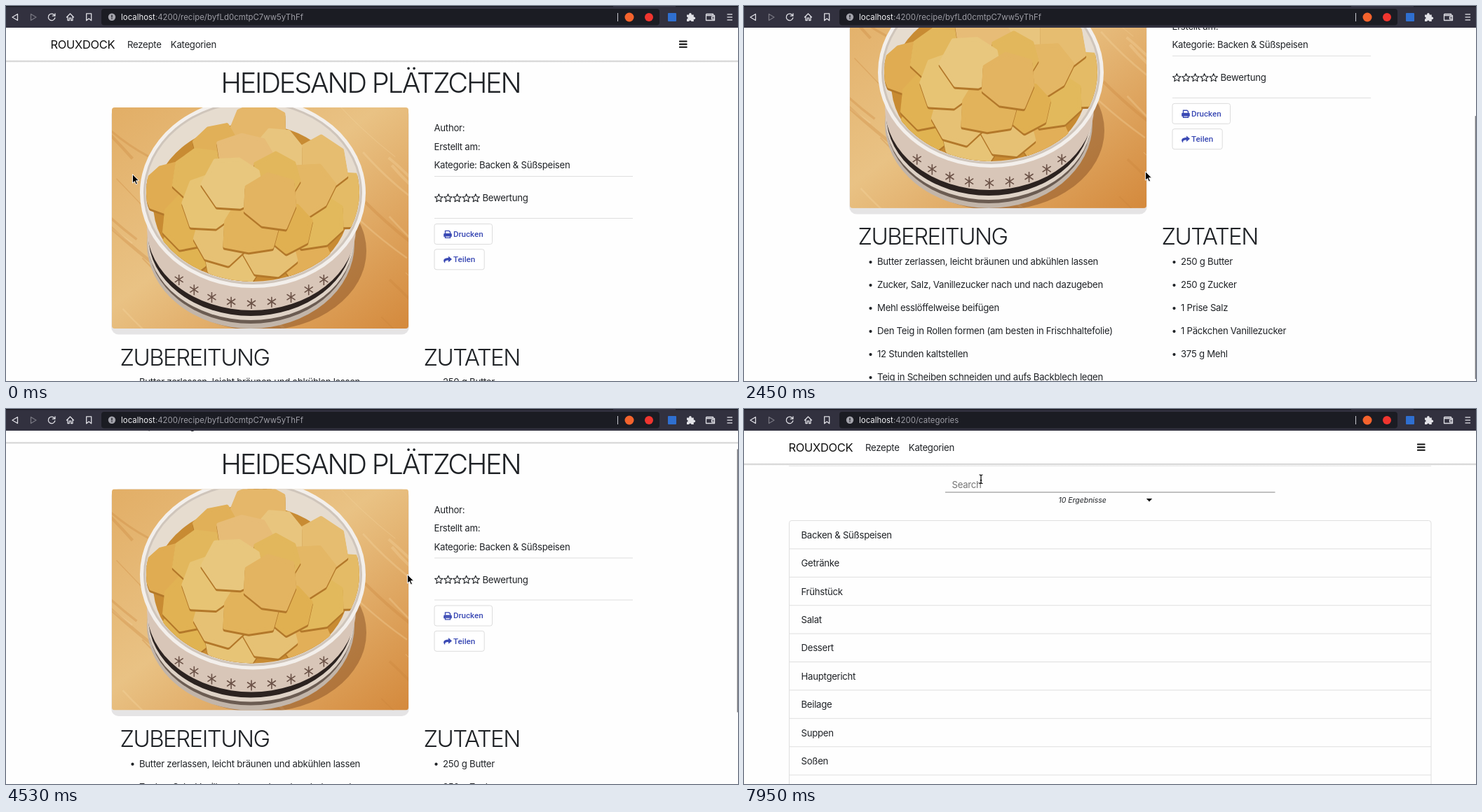
These frames come from a looping animation (1044x536 px, 8000 ms). An HTML page:

```html
<!DOCTYPE html>
<html lang="de">
<head>
<meta charset="utf-8">
<title>Rezepte</title>
<style>
  html, body { margin: 0; width: 100%; height: 100%; overflow: hidden; background: #fefefe; }
  svg { display: block; width: 1044px; height: 536px; }
  text { font: 13.2px Inter, "Noto Sans", sans-serif; letter-spacing: -.021em; fill: #1f2226; white-space: pre; }
  .brand { font-size: 16.5px; letter-spacing: -.02em; fill: #111; }
  .title { font-size: 39.6px; font-weight: 300; letter-spacing: -.0535em; }
  .head { font-size: 33px; font-weight: 300; letter-spacing: -.047em; }
  .btn { font: 500 11.55px Roboto, sans-serif; letter-spacing: 0; fill: #3a49b4; }
  .url { font-size: 11.4px; letter-spacing: .002em; fill: #9c9ca4; }
  .url tspan { fill: #f1f1f4; }
  .count { font-size: 10.56px; font-style: italic; letter-spacing: -.005em; }
  .hint { fill: #757575; }
  .line { stroke: #dfdfdf; fill: none; }
  .box { stroke: #dcdcdc; fill: #fff; }
  .icon { stroke: #dedee4; fill: none; stroke-width: 1.3; stroke-linejoin: round; stroke-linecap: round; }
</style>
</head>
<body>
<svg id="stage" viewBox="0 0 1044 536" xmlns="http://www.w3.org/2000/svg"></svg>
<script>
const text = (x, y, s, cls = '', id = '') => `<text x="${x}" y="${y}" class="${cls}" id="${id}">${s}</text>`;
const rect = (x, y, w, h, fill, r = 0) => `<rect x="${x}" y="${y}" width="${w}" height="${h}" rx="${r}" fill="${fill}"/>`;
const oval = (cx, cy, rx, ry, attrs) => `<ellipse cx="${cx}" cy="${cy}" rx="${rx}" ry="${ry}" ${attrs}/>`;
const circle = (x, y, r, fill) => oval(x, y, r, r, `fill="${fill}"`);
const path = (d, attrs) => `<path d="${d}" ${attrs}/>`;
const times = (n, fn) => Array.from({ length: n }, (_, i) => fn(i)).join('');

let seed = 11;
const random = () => (seed = seed * 16807 % 2147483647) / 2147483647;

// Closed ring of points around a centre; radius(i) gives each distance
const ring = (n, cx, cy, radius, turn = 0) => times(n, i => {
  const a = i / n * 2 * Math.PI + turn, r = radius(i);
  return `${(cx + r * Math.cos(a)).toFixed(1)},${(cy + r * Math.sin(a)).toFixed(1)} `;
});

const star = (cx, cy) => `<polygon points="${ring(10, cx, cy, i => i % 2 ? 2.7 : 6, -Math.PI / 2)}"
  fill="none" stroke="#1f2226" stroke-width="1.1" stroke-linejoin="round"/>`;

function list(x, items) {
  return items.map((s, i) => circle(x - 9.5, 538.2 + i * 33, 2.1, '#1f2226') + text(x, 542.4 + i * 33, s)).join('');
}

// One biscuit of a sunflower layout, outermost first
function biscuit(i, total) {
  const far = Math.sqrt(1 - i / total), a = i * 2.4;
  const cx = 350 + 128 * far * Math.cos(a), cy = 278 + 106 * far * Math.sin(a);
  const size = 34 + 8 * random();
  const pts = ring(7, cx, cy, () => size * (.82 + .3 * random()), a);
  const fill = `hsl(${37 + 5 * random()} 70% ${59 + 12 * random()}%)`;
  const shape = (color, dy) => `<polygon points="${pts}" fill="${color}" stroke="${color}" stroke-width="6"
    stroke-linejoin="round" transform="translate(0 ${dy})"/>`;
  return shape('#b3782a', 3) + shape(fill, 0);
}

// Simplified photo: a round tin of biscuits on a wooden table
function photo() {
  const grain = times(30, () => {
    const x = 90 + 480 * random(), y = 125 + 320 * random();
    return path(`M${x} ${y}q40 ${30 + 20 * random()} 90 ${70 + 30 * random()}`,
      `fill="none" stroke="${random() < .6 ? '#c58238' : '#f5d7a2'}" stroke-width="${1 + 4 * random()}" opacity=".3"`);
  });
  const pattern = times(9, i => {
    const a = (i * 12 + 42) * Math.PI / 180;
    const x = 350 + 139 * Math.cos(a), y = 322 + 103 * Math.sin(a);
    return path(`M${x - 6} ${y - 4}l12 8m-12 0l12 -8m-6 -3v15`, 'stroke="#6a5146" stroke-width="1.6" fill="none"');
  });
  return `<g clip-path="url(#frame)">${rect(151, 145, 423, 316, 'url(#wood)')}${grain}
    ${oval(362, 350, 152, 114, 'fill="#7c481f" opacity=".45"')}
    ${oval(349, 340, 148, 121, 'fill="#c2b5a9"')}
    ${oval(349, 337, 146, 117, 'fill="#6b5c52"')}
    ${oval(349, 334, 147, 115, 'fill="#ded2c6"')}
    ${oval(349, 329, 146, 114, 'fill="#2c2320"')}
    ${oval(350, 318, 149, 117, 'fill="#d8c6b8"')}${pattern}
    ${oval(352, 267, 161, 136, 'fill="#f3efeb"')}
    ${oval(352, 267, 156, 131, 'fill="#cfc5bb"')}
    ${oval(352, 267, 153, 128, 'fill="#e6dccf"')}
    <g clip-path="url(#tin)">${oval(350, 284, 140, 116, 'fill="#c88b33"')}${times(22, i => biscuit(i, 22))}</g></g>`;
}

const nav = rect(0, 20, 1044, 58, '#fff') + rect(0, 78, 1044, 3, 'url(#shade)') +
  text(63.5, 61, 'ROUXDOCK', 'brand') + text(173, 59.8, 'Rezepte') + text(234.8, 59.8, 'Kategorien', '', 'link') +
  times(3, i => rect(960, 49.5 + i * 4.1, 11.5, 2.1, '#111', .5));

const recipe = text(306.5, 123.5, 'HEIDESAND PLÄTZCHEN', 'title') +
  rect(150.3, 145, 424.4, 324.5, '#e5e4e5', 10) + photo() +
  ['Author:', 'Erstellt am:', 'Kategorie: Backen &amp; Süßspeisen']
    .map((s, i) => text(610.5, 179.3 + i * 26.4, s)).join('') +
  path('M611 243.5H894M611 303.5H894', 'class="line"') +
  times(5, i => star(617.3 + i * 13.1, 274.8)) + text(679.5, 279.2, 'Bewertung') +
  '<rect x="611" y="311.5" width="82.5" height="29" rx="3" class="box"/>' +
  '<rect x="611" y="347.8" width="71.2" height="29" rx="3" class="box"/>' +
  path('M626.5 325v-3.6h5.4l1.6 1.6v2M626.5 328.8h7v2.6h-7z', 'fill="#fff" stroke="#3a49b4" stroke-width="1.4"') +
  path('M624.2 326.2q0-1.3 1.3-1.3h9q1.3 0 1.3 1.3v3.6h-2v-1.7h-7.6v1.7h-2z', 'fill="#3a49b4"') +
  path('M631 357.6l5 4.3-5 4.3v-2.6c-4 0-5.2 1.2-4.8 4.2-3.8-3.6-2.3-7.7 4.8-7.7z', 'fill="#3a49b4"') +
  text(638, 330, 'Drucken', 'btn') + text(638, 366.3, 'Teilen', 'btn') +
  text(162.5, 513.6, 'ZUBEREITUNG', 'head') + text(595.5, 513.6, 'ZUTATEN', 'head') +
  list(190, ['Butter zerlassen, leicht bräunen und abkühlen lassen',
    'Zucker, Salz, Vanillezucker nach und nach dazugeben', 'Mehl esslöffelweise beifügen',
    'Den Teig in Rollen formen (am besten in Frischhaltefolie)', '12 Stunden kaltstellen',
    'Teig in Scheiben schneiden und aufs Backblech legen', '20 Minuten bei 170° backen']) +
  list(623, ['250 g Butter', '250 g Zucker', '1 Prise Salz', '1 Päckchen Vanillezucker', '375 g Mehl']);

const categories = ['Backen &amp; Süßspeisen', 'Getränke', 'Frühstück', 'Salat', 'Dessert',
  'Hauptgericht', 'Beilage', 'Suppen', 'Soßen'];
const search = rect(64, 80, 916, 2, '#e6e6e6') + text(296.5, 113, 'Search', 'hint') +
  rect(287, 118.5, 470.5, 1, '#858585') + path('M573.8 128h8.4l-4.2 4.6z', 'fill="#111"');
const results = text(448.5, 134.4, '10 Ergebnisse', 'count') +
  '<rect x="64.5" y="159.5" width="915.5" height="404" rx="3.5" class="line"/>' +
  categories.map((s, i) => text(81.5, 184.8 + i * 40.4, s) +
    path(`M65 ${(199.9 + i * 40.4).toFixed(1)}H980`, 'class="line"')).join('');

const host = '<tspan>localhost</tspan>:4200/';
const toolbar = rect(0, 0, 1044, 31, '#32313f') + rect(0, 0, 866, 1.3, '#191921') + rect(955, 0, 89, 1.3, '#191921') +
  rect(136, 4, 796, 23.5, '#1b1c23', 4) +
  path('M16.5 11.5v9l-7.5-4.5z', 'class="icon"') +
  path('M35.5 11.5v9l7.5-4.5z', 'class="icon" opacity=".4"') +
  path('M69 13A4.8 4.8 0 1 0 69.8 17M70 10.8v3.4h-3.6', 'class="icon"') +
  path('M86.5 16l5-5 5 5M88 15v5.5h2.3v-3.3h2.4v3.3H95V15', 'class="icon"') +
  path('M114.7 10.8h7v10l-3.5-2.8-3.5 2.8z', 'class="icon"') +
  circle(151, 15.8, 5.2, '#a3a3ab') + rect(150.3, 12.8, 1.4, 3.6, '#1b1c23') + rect(150.3, 17.3, 1.4, 1.4, '#1b1c23') +
  text(164, 19.8, host + 'recipe/byfLd0cmtpC7ww5yThFf', 'url', 'urlRecipe') +
  text(164, 19.8, host + 'categories', 'url', 'urlCats') +
  rect(872, 10, 1, 12, '#c9c9d0') + circle(889, 16, 6.5, '#f4632d') + circle(917, 16, 6, '#f0352f') +
  rect(944, 10, 12, 12, '#2f6fd0', 1) +
  path('M971 12.5h3.2a1.8 1.8 0 1 1 3.4 0h3.2v3.2a1.8 1.8 0 1 1 0 3.4v2.9h-3.4a1.6 1.6 0 0 0-3.2 0H971v-3.4a1.6 1.6 0 0 0 0-3.2z', 'fill="#e2e2e7"') +
  path('M999 11.5h9.5v2M998.5 12v8.5h12v-7h-11M1010.5 15.5h-4v3h4', 'class="icon"') +
  times(3, i => rect(1028.5, 11.3 + i * 4, 7.5, 1.3, '#dedee4'));

const cursor = `<g id="cursor">
  <g id="arrow">${path('M0 0v12.6l2.9-2.6 2.1 4.6 2-.9-2-4.5h4z', 'fill="#000" stroke="#fff" stroke-width=".9"')}</g>
  <g id="hand">${path('M-1.2 7V1.2q0-1.2 1.1-1.2t1.1 1.2V5q2-.5 2.3.6 2-.4 2.3.7 2-.2 2 1.4 0 3-1.6 4.5v2H-.6v-2Q-2.6 9.8-4.2 7.7q-.5-1.5.8-1.7 1 0 2.2 2M2.2 9v3M4.2 9v3M.4 9v3', 'fill="#fff" stroke="#000" stroke-width="1.1" stroke-linejoin="round"')}</g>
  <g id="beam">${path('M-2.5-6Q0-6 0-4.5Q0-6 2.5-6M0-4.5V5M-2.5 6.5Q0 6.5 0 5Q0 6.5 2.5 6.5M-1.3 1.8h2.6', 'fill="none" stroke="#000" stroke-width="1.2"')}</g>
</g>`;

const $ = id => document.getElementById(id);
$('stage').innerHTML = `<defs>
  <linearGradient id="wood" x1="0" y1="0" x2="1" y2="1"><stop stop-color="#e2ae66"/><stop offset=".45" stop-color="#e9c284"/><stop offset="1" stop-color="#d4893c"/></linearGradient>
  <linearGradient id="shade" x1="0" y1="0" x2="0" y2="1"><stop stop-color="#c4c4c4"/><stop offset="1" stop-color="#fefefe"/></linearGradient>
  <clipPath id="frame">${rect(151, 145, 423, 316, '#000', 4)}</clipPath>
  <clipPath id="tin">${oval(352, 267, 152, 127, '')}</clipPath>
</defs>
${rect(0, 0, 1044, 536, '#fefefe')}
<g id="page"><g id="recipe">${recipe}</g><g id="search">${search}</g><g id="results">${results}</g>${nav}</g>
<g id="bar">${rect(1042.7, 36, 1.3, 376, '#77777c')}</g>${toolbar}${cursor}`;

const LOOP = 8000, START = 534, TICK = 147.8;
const DEPTH = 201.5, SCROLL_DOWN = 6, SCROLL_UP = 22;
const ramp = (n, from, to) => Math.min(1, Math.max(0, (n - from) / (to - from)));
const smooth = k => k * k * (3 - 2 * k);

function scrollAt(n) {
  if (n < SCROLL_DOWN) return 0;
  if (n < SCROLL_UP) return DEPTH * (1 - Math.exp(-(((n - SCROLL_DOWN) / 4.25) ** 1.9)));
  const bounce = .8 * Math.exp(-2 * (n - 30) ** 2);
  return DEPTH * Math.exp(-(((n - SCROLL_UP) / 4.17) ** 3.5)) - bounce;
}

const home = { x: 180.5, y: 240.5 };
const moves = [
  { x: 572.5, y: 236.5, from: -1, to: 3, bow: 40 },
  { x: 577, y: 220.5, from: 29, to: 30, bow: 0 },
  { x: 241.5, y: 56, from: 30, to: 34, bow: 0 },
  { x: 338, y: 100, from: 45, to: 50, bow: 0 }
];

function cursorAt(n) {
  return moves.reduce((p, m) => {
    const k = smooth(ramp(n, m.from, m.to));
    return { x: p.x + (m.x - p.x) * k, y: p.y + (m.y - p.y) * k - m.bow * Math.sin(Math.PI * k) };
  }, home);
}

const show = (id, on) => $(id).setAttribute('opacity', +on);
const place = (id, x, y) => $(id).setAttribute('transform', `translate(${x} ${y})`);

function draw(now) {
  const n = Math.floor((now % LOOP - START) / TICK);
  const scroll = scrollAt(n), mouse = cursorAt(n);
  const onLink = n >= 33 && n < 47, onInput = n >= 49, onCats = n >= 37;

  place('page', 0, -scroll);
  place('bar', 0, Math.max(0, scroll) * .704);
  show('bar', n <= SCROLL_DOWN ? 0 : 1 - (n < 24 ? ramp(n, 18, 22) : ramp(n, 30, 34)));

  place('cursor', mouse.x, mouse.y);
  show('hand', onLink);
  show('beam', onInput);
  show('arrow', !onLink && !onInput);
  $('link').style.fill = onLink ? '#666' : '';

  show('recipe', !onCats);
  show('urlRecipe', !onCats);
  show('search', onCats);
  show('urlCats', onCats);
  show('results', n >= 38);
  requestAnimationFrame(draw);
}
requestAnimationFrame(draw);
</script>
</body>
</html>
```
